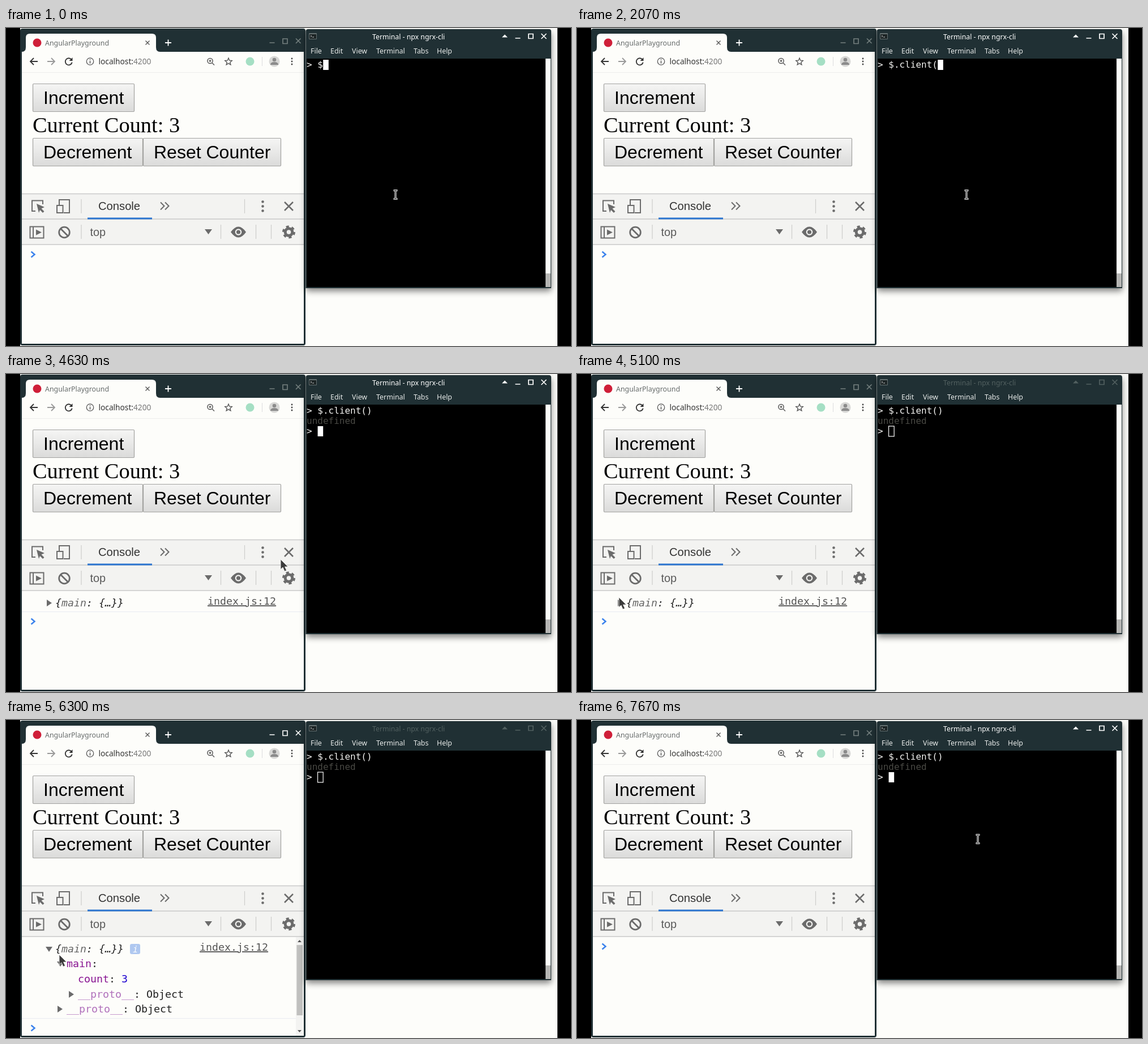
An HTML page for the animation above (8000 ms loop, 998x561 px).

```html
<!DOCTYPE html>
<html lang="en">
<head>
<meta charset="utf-8">
<title>Counter playground</title>
<style>
html, body { margin: 0; width: 100%; height: 100%; overflow: hidden; background: #000; }
svg { display: block; width: 998px; height: 561px; }
text { white-space: pre; }
.ui { font-family: "Noto Sans", sans-serif; }
.sans { font-family: "Liberation Sans", Arial, sans-serif; }
.serif { font-family: "Liberation Serif", serif; }
.mono { font-family: "DejaVu Sans Mono", monospace; }
.line { fill: none; stroke: currentColor; }
.solid { fill: currentColor; }
#browserButtons, #terminalTitle { color: #fff; }
#browserButtons.dim { color: #75807f; }
#terminalTitle.dim { color: #526060; }
</style>
</head>
<body>
<svg viewBox="0 0 998 561">
  <defs>
    <linearGradient id="button" x2="0" y2="1">
      <stop stop-color="#f5f5f4"/><stop offset="1" stop-color="#dbdbda"/>
    </linearGradient>
    <filter id="blur" x="-10%" y="-10%" width="120%" height="125%"><feGaussianBlur stdDeviation="6"/></filter>
    <clipPath id="desk"><rect x="25" width="949" height="561"/></clipPath>
  </defs>

  <rect width="998" height="561"/>
  <rect x="25" width="949" height="561" fill="#fdfdfa"/>

  <g id="browser">
    <rect x="25" y="1" width="504" height="559" rx="4" fill="#203034"/>
    <path d="M28 42Q35 42 35 34V17Q35 10 42 10H258Q265 10 265 17V34Q265 42 272 42H526V557H28Z" fill="#fdfdfa"/>
    <circle cx="55" cy="26" r="7.5" fill="#cf1f39"/>
    <text class="ui" x="69" y="30.5" font-size="12.4" fill="#666b6b">AngularPlayground</text>
    <path d="M246.5 22.5l7 7m0-7l-7 7" class="line" color="#555" stroke-width="1.4"/>
    <path d="M281 26h11m-5.500-5.500v11" class="line" color="#fff" stroke-width="1.8"/>
    <g id="browserButtons" class="line" stroke-width="1.6">
      <path d="M465.500 26h9M489 19h8v8.500h-8zM512 18.500l8.500 8.500m0-8.500l-8.500 8.500"/>
    </g>

    <g class="line" stroke-width="1.8">
      <path d="M56 59H43m6-6l-6 6 6 6" color="#333"/>
      <path d="M73 59h13m-6-6l6 6-6 6" color="#999"/>
      <path d="M115.500 55.500a6 6 0 1 0 1.200 5" color="#333"/>
      <circle cx="148.500" cy="59" r="6.200" color="#555" stroke-width="1.300"/>
      <path d="M148.500 58v4.500m0-7.500v1.500" color="#555" stroke-width="1.500"/>
      <circle cx="360.500" cy="58" r="4.600" color="#555" stroke-width="1.500"/>
      <path d="M364 61.500l4 4M358.500 58h4m-2-2v4" color="#555" stroke-width="1.400"/>
      <path id="star" color="#555" stroke-width="1.400"/>
    </g>
    <path d="M117.500 52v6h-6z" fill="#333"/>
    <circle cx="431" cy="59" r="7.500" fill="#a5dfc4"/>
    <path d="M452.500 51v16" stroke="#ddd"/>
    <circle cx="474" cy="59" r="9.500" fill="#d8d8d6"/>
    <circle cx="474" cy="56" r="3.300" fill="#8b8b8b"/>
    <path d="M467 65q0-5 7-5t7 5z" fill="#8b8b8b"/>
    <g fill="#444"><circle cx="505" cy="54" r="1.400"/><circle cx="505" cy="59" r="1.400"/><circle cx="505" cy="64" r="1.400"/></g>
    <text class="ui" x="163.500" y="64" font-size="13.700" fill="#333">localhost:<tspan fill="#777">4200</tspan></text>
    <path d="M28 78.500H526" stroke="#eeeeec"/>

    <g id="buttons"></g>
    <text class="serif" x="47" y="184" font-size="38.400">Current Count: 3</text>

    <g id="devtools">
      <rect x="28" y="292" width="498" height="90" fill="#f3f3f1"/>
      <path d="M28 292.500H526M28 337H526M28 382H526" stroke="#c9c9c9" stroke-width="1.400"/>
      <path d="M133 302v25M421.500 302v25M133 347v25M379.500 347v25M441.500 347v25M468.500 347v25" stroke="#cdcdcb" stroke-width="1.200"/>
      <rect x="144" y="334.500" width="114" height="3" fill="#2b74d0"/>
      <text class="sans" x="163" y="321" font-size="20.200" fill="#333">Console</text>
      <text class="sans" x="148.500" y="367" font-size="19.800" fill="#5a5a5a">top</text>
      <g class="line" color="#6b6b6b" stroke-width="2">
        <path d="M52 323H46V304.500H65V311"/>
        <path d="M94 313V303H112V326H102" />
        <rect x="90" y="313" width="10.500" height="13"/>
        <path d="M273 307.500l6.500 6.500-6.500 6.500m8-13l6.500 6.500-6.500 6.500"/>
        <path d="M492 307l15 15m0-15l-15 15" stroke-width="2.500"/>
        <path d="M42.500 350.500H66.500V370.500H42.500ZM48 350.500v20"/>
        <circle cx="103" cy="360.500" r="9.300" stroke-width="2.800"/>
        <path d="M96.500 354l13 13" stroke-width="2.800"/>
        <circle cx="499.500" cy="360" r="6.300" stroke-width="5"/>
        <circle cx="499.500" cy="360" r="9.800" stroke-width="3.400" stroke-dasharray="5.130"/>
      </g>
      <g fill="#6b6b6b">
        <path d="M54 310l14 6-5.500 2.500 5 5-2.500 2.500-5-5-2 5zM53 355.500l10 5-10 5z"/>
        <circle cx="453.500" cy="306.500" r="2.300"/><circle cx="453.500" cy="314.500" r="2.300"/><circle cx="453.500" cy="322.500" r="2.300"/>
        <path d="M351 355h13l-6.500 9zM397 360q13.500-19 27 0q-13.500 19-27 0z"/>
      </g>
      <circle cx="410.500" cy="360" r="4.700" fill="#6b6b6b" stroke="#f3f3f1" stroke-width="2.200"/>
    </g>

    <g id="log" class="mono" font-size="18.300"></g>
    <path id="prompt" d="M44.500 394.500l6 5-6 5" fill="none" stroke="#3b82ec" stroke-width="2.500"/>

    <g id="tooltip">
      <rect x="80" y="386" width="222" height="41" rx="2" fill="#000" opacity=".2" filter="url(#blur)"/>
      <rect x="80.500" y="386.500" width="221" height="40" rx="2" fill="#fdfdfb" stroke="#bdbdbd"/>
      <g class="sans" font-size="20" fill="#444">
        <text x="93.500" y="413">Clear console</text><text x="230" y="413" fill="#777">Ctrl+L</text>
      </g>
    </g>
  </g>

  <g id="terminal" clip-path="url(#desk)">
    <rect x="530" y="8" width="433" height="456" opacity=".5" filter="url(#blur)"/>
    <path d="M529.500 459V6Q529.500 2 534 2H959Q963 2 963 6V459Z" fill="#203034"/>
    <rect x="531" y="54" width="422" height="403"/>
    <rect x="953" y="54" width="9" height="403" fill="#fdfdfa"/>
    <rect x="953" y="433" width="9" height="24" fill="#b5b5b3"/>
    <rect x="535" y="9" width="14" height="11" rx="1" fill="#657071"/>
    <rect x="536" y="11" width="12" height="8" fill="#1c2425"/>
    <path d="M538 13l2 1.500-2 1.500m3 0h3" fill="none" stroke="#ccc"/>
    <g id="terminalTitle">
      <text class="ui solid" x="647" y="19.500" font-size="12.300">Terminal - npx ngrx-cli</text>
      <path class="solid" d="M876 16.500l5-5 5 5z"/>
      <path class="line" stroke-width="1.700" d="M899.500 18h9M923 10.500h8v8h-8zM945.500 10l9 9m0-9l-9 9"/>
    </g>
    <g id="menu" class="ui" font-size="12.400" fill="#e8ebea"></g>
    <g class="mono" font-size="16" fill="#f4f4f2">
      <text id="command" x="531" y="70"></text>
      <g id="answer"><text x="531" y="88" fill="#494944">undefined</text><text x="531" y="106">&gt;</text></g>
    </g>
    <rect id="caret" width="9.600" height="18" stroke="#fff" stroke-width="1.200"/>
  </g>

  <g id="pointer">
    <path id="arrow" d="M0 0V17.500l4-3.500 3 7 3.500-1.500-3-6.500h5.500z" fill="#3b3b3b" stroke="#f4f4f2" stroke-width=".8"/>
    <g id="beam" fill="none">
      <path d="M-3.500-7.500H3.500M0-7.500V7.500M-3.500 7.500H3.500" stroke="#f2f2f2" stroke-width="3.200"/>
      <path d="M-3-7.500H3M0-7.500V7.500M-3 7.500H3" stroke="#222" stroke-width="1.100"/>
    </g>
  </g>
</svg>
<script>
const LOOP = 8000;
const $ = id => document.getElementById(id);
const show = (id, on) => $(id).setAttribute('display', on ? 'inline' : 'none');
const place = (id, x, y) => $(id).setAttribute('transform', `translate(${x} ${y})`);

$('star').setAttribute('d', 'M' + Array.from({ length: 10 }, (_, i) => {
  const r = i % 2 ? 2.9 : 6.5, a = i * Math.PI / 5;
  return `${393 + r * Math.sin(a)} ${59.5 - r * Math.cos(a)}`;
}).join('L') + 'Z');

$('buttons').innerHTML = [['Increment', 47, 98, 180], ['Decrement', 47, 194, 195], ['Reset Counter', 242, 194, 244]]
  .map(([label, x, y, w]) =>
    `<rect x="${x + .5}" y="${y + .5}" width="${w - 1}" height="49" rx="1.5" fill="url(#button)" stroke="#a2a2a0" stroke-width="1.2"/>
     <text class="sans" x="${x + 19}" y="${y + 36}" font-size="32">${label}</text>`).join('');

$('menu').innerHTML = [['File', 538], ['Edit', 573], ['View', 611], ['Terminal', 654], ['Tabs', 720], ['Help', 761]]
  .map(([label, x]) => `<text x="${x}" y="45">${label}</text>`).join('');

// Console tree, drawn for 0 = empty, 1 = folded, 2 = object open, 3 = child open
const row = (x, y, body) => `<text x="${x}" y="${y}" fill="#222">${body}</text>`;
const tint = (color, s) => `<tspan fill="${color}">${s}</tspan>`;
const fold = (x, y, open) =>
  `<path fill="#6b6b6b" d="M${x} ${y}${open ? 'm-6-4h12l-6 9z' : 'm-4-6v12l9-6z'}"/>`;
const proto = (x, y) => fold(x - 12, y - 6) + row(x, y, tint('#b070bb', '__proto__') + ': Object');
const purple = '#881391';

function drawLog(level) {
  if (!level) return '';
  const linkX = level === 3 ? 342 : 356;
  const bottom = [0, 419.5, 473, 526.5][level];
  let out = fold(76, 404, level > 1) +
    `<text x="87" y="410" font-style="italic" fill="#222">{${tint('#666', 'main')}: {…}}</text>` +
    `<text x="${linkX}" y="407" fill="#555" text-decoration="underline">index.js:12</text>` +
    `<path d="M28 ${bottom}H526" stroke="#e9ebf2"/>`;
  if (level > 1) {
    out += '<rect x="219" y="395" width="18" height="18" rx="3" fill="#afc8f0"/>' +
      '<text x="224" y="410" font-size="15" font-style="italic" fill="#fff">i</text>' +
      fold(96, 430, level === 3) +
      row(107, 436, tint(purple, 'main') + (level === 3 ? ':' : `: {${tint(purple, 'count')}: ${tint('#1c00cf', 3)}}`));
  }
  if (level === 2) out += proto(107, 463);
  if (level === 3) {
    out += row(127, 463, tint(purple, 'count') + ': ' + tint('#1c00cf', 3)) + proto(127, 490) + proto(107, 516) +
      `<rect x="512" y="383" width="13" height="174" fill="#f3f3f1"/>
       <rect x="513.500" y="397" width="10.500" height="124" fill="#c0c0be"/>
       <path d="M515 392l3.500-4 3.500 4zM515 547l3.500 4 3.500-4z" fill="#555"/>`;
  }
  return out;
}

// Each table row: start time, then value
const command = '$.client()';
const keys = [[0, 1], [150, 2], [330, 3], [480, 4], [630, 5], [800, 6], [930, 7], [1200, 8], [1600, 9], [2400, 10]];
const levels = [[0, 0], [4400, 1], [5200, 2], [5840, 3], [7030, 0]];
const promptY = [0, 37, 90.5, 144];
const path = [[0, 688, 294], [4400, 688, 294], [5000, 74, 394], [5620, 74, 394], [5780, 94, 414],
  [6370, 94, 414], [6540, 96, 369], [7080, 96, 369], [7600, 708, 210], [LOOP, 708, 210]];
const stepAt = (table, t) => table.filter(r => r[0] <= t).pop()[1];

function pointerAt(t) {
  const i = path.findIndex(p => p[0] > t);
  const [t0, x0, y0] = path[i - 1], [t1, x1, y1] = path[i];
  const k = (t - t0) / (t1 - t0), e = k * k * (3 - 2 * k);
  return [x0 + (x1 - x0) * e, y0 + (y1 - y0) * e];
}

let shownLevel = -1;
function render(t) {
  const entered = t >= 2800;
  const terminalFocus = t < 5070 || t >= 7640;
  const browserFocus = t >= 5130 && t < 7640;
  const typed = stepAt(keys, t);

  $('command').textContent = '> ' + command.slice(0, typed);
  show('answer', entered);
  const column = entered ? 2 : typed + 2;
  place('caret', 531.3 + column * 9.632, entered ? 92 : 56);
  $('caret').setAttribute('fill', terminalFocus ? '#fff' : 'none');
  $('caret').setAttribute('stroke-opacity', terminalFocus ? 0 : 1);
  $('terminalTitle').classList.toggle('dim', !terminalFocus);
  $('browserButtons').classList.toggle('dim', !browserFocus);

  const level = stepAt(levels, t);
  if (level !== shownLevel) {
    $('log').innerHTML = drawLog(level);
    place('prompt', 0, promptY[level]);
    shownLevel = level;
  }
  const fade = t < 7030 ? Math.min(1, Math.max(0, (t - 6805) / 100)) : 0;
  $('tooltip').setAttribute('opacity', fade);

  const [x, y] = pointerAt(t);
  place('pointer', x, y);
  show('beam', x > 530);
  show('arrow', x <= 530);
}

const start = performance.now();
function tick() {
  render((performance.now() - start) % LOOP);
  requestAnimationFrame(tick);
}
tick();
</script>
</body>
</html>
```
